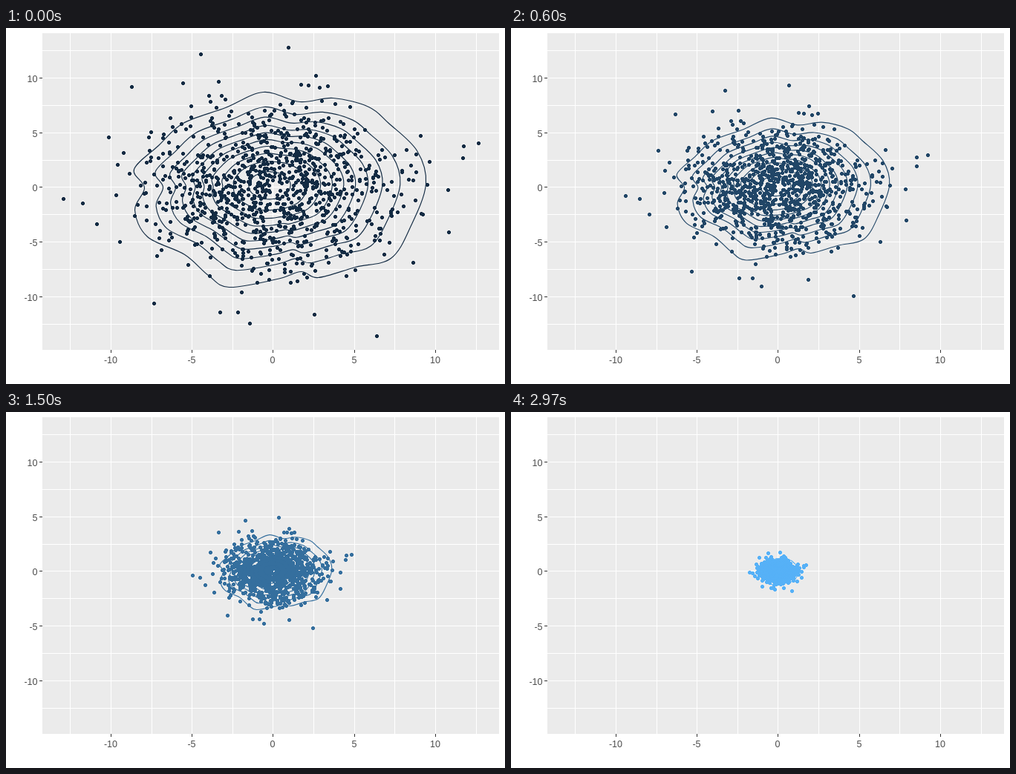
These frames come from a looping animation (672x480 px, 3000 ms). An HTML page with a canvas:

```html
<!DOCTYPE html>
<html lang="en">
<head>
<meta charset="utf-8">
<title>Shrinking density scatter</title>
<style>
html, body { margin: 0; width: 100%; height: 100%; overflow: hidden; background: #fff; }
svg, canvas { position: absolute; left: 0; top: 0; width: 672px; height: 480px; }
text { font: 12.5px "Liberation Sans", Arial, sans-serif; fill: #4d4d4d; }
</style>
</head>
<body>
<svg id="axes" viewBox="0 0 672 480"></svg>
<canvas id="plot" width="672" height="480"></canvas>
<script>
const CX = 359.4, CY = 214.4, STEP = 30, FRAMES = 100, DOTS = 1000;

// Axes and grid
const gridX = v => Math.floor(359.9 + 21.85 * v);
const gridY = v => Math.floor(214.9 - 14.74 * v);
const rect = (x, y, w, h, fill) =>
  `<rect x="${x}" y="${y}" width="${w}" height="${h}" fill="${fill}" shape-rendering="crispEdges"/>`;
const label = (x, y, anchor, value) =>
  `<text x="${x}" y="${y}" text-anchor="${anchor}">${value}</text>`;

let axes = rect(49, 7, 615, 427, '#ebebeb');
for (let v = -12.5; v <= 12.5; v += 2.5) {
  const x = gridX(v), y = gridY(v);
  axes += rect(x, 7, 1, 427, '#fff') + rect(49, y, 615, 1, '#fff');
  if (v % 5 === 0) {
    axes += rect(x, 434, 1, 4, '#333') + label(x, 452, 'middle', v);
    axes += rect(45, y, 4, 1, '#333') + label(42.5, y + 6, 'end', v);
  }
}
document.getElementById('axes').innerHTML = axes;

// Offsets from the centre at full size
const pairs = list => {
  const out = [];
  for (let i = 0; i < list.length; i += 2) out.push([list[i] - CX, list[i + 1] - CY]);
  return out;
};

let seed = 4127;
function random() {
  seed = (seed + 0x6d2b79f5) | 0;
  let t = Math.imul(seed ^ (seed >>> 15), 1 | seed);
  t = (t + Math.imul(t ^ (t >>> 7), 61 | t)) ^ t;
  return ((t ^ (t >>> 14)) >>> 0) / 4294967296;
}

// The farthest dots are placed, the rest follow a normal distribution
const dots = pairs([
  262,35, 380,26, 169,79, 238,74, 417,64, 286,72, 138,147, 77,230,
  103,236, 122,264, 153,288, 199,371, 288,383, 312,383, 328,398, 415,386,
  499,415, 596,275, 595,218, 615,175, 616,159, 636,155, 558,145, 548,316
]);
while (dots.length < DOTS) {
  const r = Math.sqrt(-2 * Math.log(1 - random())), a = random() * 2 * Math.PI;
  if (r < 2.6) dots.push([85 * r * Math.cos(a), 57 * r * Math.sin(a)]);
}

// Density contours: one outline, shrinking and rounding with each level
const outline = pairs([
  172,190, 186,215, 173,245, 190,281, 240,305, 272,333, 300,349, 365,338,
  397,328, 420,336, 470,322, 518,310, 545,266, 565,210, 553,165, 515,128,
  488,106, 440,94, 395,99, 346,86, 295,107, 238,128, 205,158
]);
const PEAK = 10.5;
function ringAt(level) {
  const scale = Math.sqrt(Math.log(PEAK / level) / Math.log(PEAK));
  const round = (level - 1) / PEAK, shift = -6 * (1 - scale);
  return outline.map(([x, y]) => {
    const a = Math.atan2(y / 130, x / 196);
    return [
      scale * (x + (196 * Math.cos(a) - x) * round) + shift,
      scale * (y + (130 * Math.sin(a) - y) * round) + shift / 2
    ];
  });
}
const rings = Array.from({ length: 10 }, (_, i) => ringAt(i + 1));

// Steady exponential shrinking after a soft start
const sizeAt = n => Math.exp(-.0214 * (n - 5.2 * Math.tanh(n / 5.2)));

const dark = [19, 43, 67], light = [86, 177, 247];
const colorAt = p => `rgb(${dark.map((c, i) => Math.round(c + (light[i] - c) * p))})`;

const ctx = document.getElementById('plot').getContext('2d');

// Closed smooth curve through all points
function drawRing(points, size) {
  const count = points.length;
  const at = i => {
    const [x, y] = points[(i + count) % count];
    return [CX + .5 + x * size, CY + .5 + y * size];
  };
  const handle = (p, from, to) => [p[0] + (to[0] - from[0]) / 6, p[1] + (to[1] - from[1]) / 6];
  ctx.beginPath();
  ctx.moveTo(...at(0));
  for (let i = 0; i < count; i++) {
    const a = at(i - 1), b = at(i), c = at(i + 1), d = at(i + 2);
    ctx.bezierCurveTo(...handle(b, a, c), ...handle(c, d, b), ...c);
  }
  ctx.stroke();
}

function draw(n) {
  const size = sizeAt(n);
  ctx.clearRect(0, 0, 672, 480);
  ctx.fillStyle = ctx.strokeStyle = colorAt(n / (FRAMES - 1));
  ctx.lineWidth = 1.15;
  for (const [dx, dy] of dots) {
    const x = Math.round(CX + dx * size), y = Math.round(CY + dy * size);
    ctx.fillRect(x - 2, y - 1, 5, 3);
    ctx.fillRect(x - 1, y - 2, 3, 5);
  }
  for (const ring of rings) drawRing(ring, size);
}

const start = performance.now();
let shown = -1;
function tick() {
  const n = Math.floor((performance.now() - start) / STEP) % FRAMES;
  if (n !== shown) draw(shown = n);
  requestAnimationFrame(tick);
}
tick();
</script>
</body>
</html>
```
